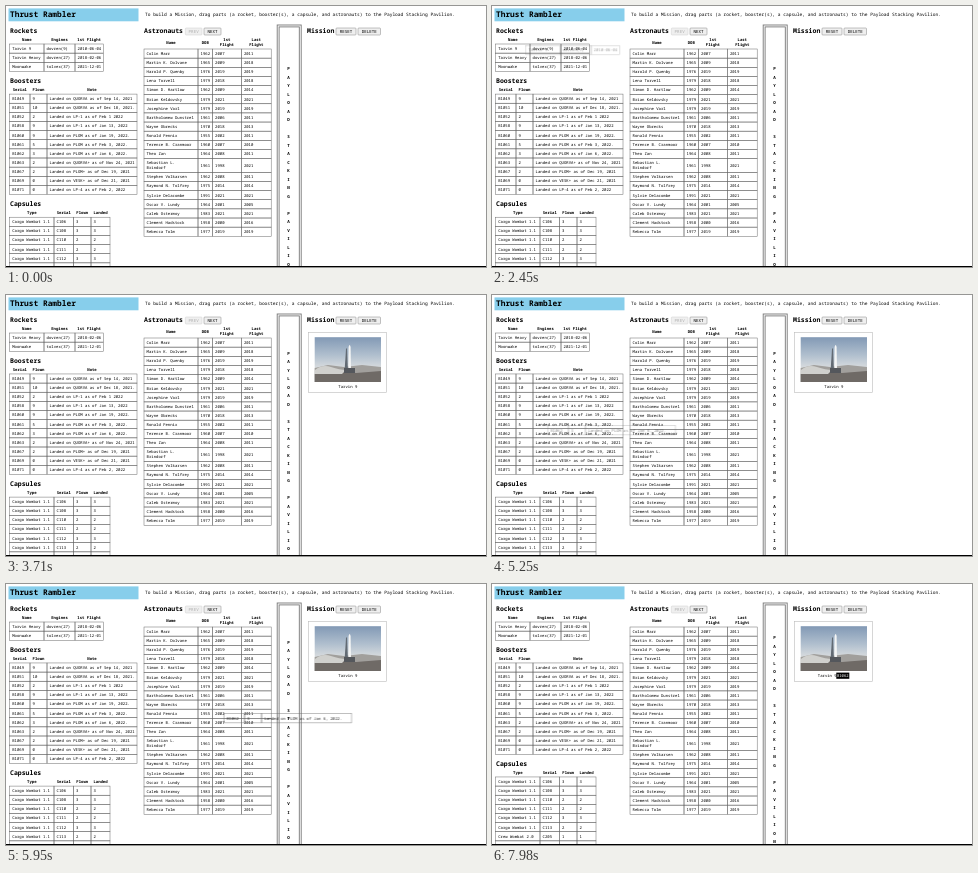
Recreate the animation shown at these times as an HTML page. Size 480x261 px, loop 8 s.

```html
<!DOCTYPE html>
<html lang="en">
<head>
<meta charset="utf-8">
<title>Thrust Rambler</title>
<style>
  html, body { margin: 0; width: 100%; height: 100%; overflow: hidden; background: #fff; }
  svg { display: block; width: 100%; height: 100%; }
  text {
    font: 3.95px "Noto Sans Mono", "DejaVu Sans Mono", monospace;
    text-rendering: geometricPrecision;
    white-space: pre;
  }
</style>
</head>
<body>
<svg id="stage" viewBox="0 0 480 261">
  <defs>
    <linearGradient id="sky" x1="0" y1="0" x2="0" y2="1">
      <stop offset="0" stop-color="#8299b5"/>
      <stop offset=".4" stop-color="#b0bfce"/>
      <stop offset=".7" stop-color="#dadddf"/>
    </linearGradient>
  </defs>
</svg>
<script>
const LOOP = 8000, ROW = 9.13, GAP = 22.7;
const FIRST_DROP = 3710, SECOND_DROP = 6860;
const stage = document.getElementById('stage');

const rockets = [
  ['Tarvin 9', 'dovren(9)', '2010-06-04'],
  ['Tarvin Heavy', 'dovren(27)', '2018-02-06'],
  ['Moonwake', 'tolvex(37)', '2021-12-01']
];
const boosters = [
  ['B1049', '9', 'QUORVA as of Sep 14, 2021'],
  ['B1051', '10', 'QUORVA as of Dec 18, 2021.'],
  ['B1052', '2', 'LP-1 as of Feb 1 2022'],
  ['B1058', '9', 'LP-1 as of Jan 13, 2022'],
  ['B1060', '9', 'PLOM as of Jan 19, 2022.'],
  ['B1061', '5', 'PLOM as of Feb 3, 2022.'],
  ['B1062', '3', 'PLOM as of Jan 6, 2022.'],
  ['B1063', '2', 'QUORVA+ as of Nov 24, 2021'],
  ['B1067', '2', 'PLOM+ as of Dec 19, 2021'],
  ['B1069', '0', 'VESK+ as of Dec 21, 2021'],
  ['B1071', '0', 'LP-4 as of Feb 2, 2022']
].map(([id, flown, note]) => [id, flown, 'Landed on ' + note]);
const capsules = [
  ['C106', 3], ['C108', 3], ['C110', 2], ['C111', 2], ['C112', 3], ['C113', 2], ['C205', 1], ['C206', 2]
].map(([id, n]) => [id < 'C2' ? 'Cargo Wombat 1.1' : 'Crew Wombat 2.0', id, n, n]);
const astronauts = `Colin Marr,1962,2007,2011
Martin K. Dolvane,1965,2009,2018
Harold P. Quenby,1976,2019,2019
Lena Torvell,1979,2018,2018
Simon D. Hartlow,1962,2009,2014
Brian Keldovsky,1979,2021,2021
Josephine Varl,1979,2019,2019
Bartholomew Dunstrel,1961,2006,2011
Wayne Obrecks,1970,2018,2013
Ronald Fennix,1955,2002,2011
Terence B. Cranmoor,1960,2007,2010
Theo Zan,1964,2008,2011
Sebastian L.|Brindorf,1961,1998,2021
Stephen Volkarsen,1962,2008,2011
Raymond N. Tolfrey,1975,2014,2014
Sylvie Delacombe,1991,2021,2021
Oscar V. Lundy,1964,2001,2005
Caleb Ostermoy,1983,2021,2021
Clement Hadstock,1958,2000,2016
Rebecca Tolm,1977,2019,2019`.split('\n').map(line => line.split(','));

const rocketCols = [3.6, 38, 69, 97.3];
const boosterCols = [3.6, 24, 41, 131];
const capsuleCols = [3.6, 48, 67.5, 85, 104];
const astronautCols = [138, 192, 206.5, 235.3, 265.2];

function add(parent, tag, attrs = {}) {
  const el = document.createElementNS('http://www.w3.org/2000/svg', tag);
  for (const k in attrs) el.setAttribute(k, attrs[k]);
  return parent.appendChild(el);
}
function rect(g, x, y, width, height, fill, stroke = 'none', sw = 0.5) {
  return add(g, 'rect', { x, y, width, height, fill, stroke, 'stroke-width': sw });
}
// y is the middle of the line
function text(g, str, x, y, { size = 3.95, bold, fill = '#000', anchor = 'start' } = {}) {
  const el = add(g, 'text', { x, y: y + size * 0.35, fill, 'text-anchor': anchor });
  el.style.fontSize = size + 'px';
  if (bold) el.style.fontWeight = 700;
  el.textContent = str;
}
function heading(g, str, x, y) {
  text(g, str, x, y, { size: 6.5, bold: true });
}
function lines(g, str, x, y, style) {
  const parts = String(str).split('|');
  parts.forEach((s, i) => text(g, s, x, y + (i - (parts.length - 1) / 2) * 4.7, style));
}
function row(g, cols, y, cells, h = ROW) {
  cells.forEach((cell, i) => {
    rect(g, cols[i], y, cols[i + 1] - cols[i], h, 'none', '#6a6a6a');
    lines(g, cell, cols[i] + 2.6, y + h / 2);
  });
}
function table(g, cols, y, heads, rows, headY = y - 4.7) {
  heads.forEach((s, i) =>
    lines(g, s, (cols[i] + cols[i + 1]) / 2, headY, { bold: true, anchor: 'middle' }));
  for (const cells of rows) {
    const h = cells[0].includes('|') ? 13.8 : ROW;
    row(g, cols, y, cells, h);
    y += h;
  }
  return y;
}
function button(g, str, x, w, off) {
  rect(g, x, 22, w, 7, '#efefef', off ? '#cfcfcf' : '#858585', 0.5).setAttribute('rx', 0.8);
  text(g, str, x + w / 2, 25.5, { size: 4.2, anchor: 'middle', fill: off ? '#b0b0b0' : '#000' });
}

function card(g, booster) {
  rect(g, 302.5, 37.5, 78, 60, '#fff', '#bbb', 0.6);
  const shape = (d, fill) => add(g, 'path', { d, fill });
  rect(g, 308.7, 42.2, 66.3, 44.8, 'url(#sky)');
  shape('M308.7 73 L322 70 L338 72 L356 70 L375 72 V87 H308.7Z', '#a19f9c');
  shape('M308.7 79 L328 75 L350 78 L375 76 V87 H308.7Z', '#6f6a66');
  shape('M309 75 Q316 69 325 72 T340 75 L336 79 H309Z', '#d0d0cd');
  shape('M340 54 L341 53 L342 77 H338.5Z', '#626a73');
  shape('M342.4 76 L342.6 52 Q343.6 48 344.6 52 L345 76Z', '#f4f5f5');
  shape('M338 73 H349 V78 H338Z', '#54575c');
  if (booster) {
    text(g, 'Tarvin 9', 325.8, 91.7);
    rect(g, 344.3, 88.6, 13, 6.2, '#000');
    text(g, booster, 344.9, 91.7, { fill: '#fff' });
  } else {
    text(g, 'Tarvin 9', 341.8, 91.7, { anchor: 'middle' });
  }
}

function scene(step) {
  const g = add(stage, 'g');
  const left = step > 0 ? rockets.slice(1) : rockets;
  const stock = step > 1 ? boosters.filter(b => b[0] !== 'B1062') : boosters;
  heading(g, 'Rockets', 4, 24.3);
  let y = table(g, rocketCols, 38, ['Name', 'Engines', '1st Flight'], left);
  heading(g, 'Boosters', 4, y + 9);
  y = table(g, boosterCols, y + GAP, ['Serial', 'Flown', 'Note'], stock);
  heading(g, 'Capsules', 4, y + 9);
  table(g, capsuleCols, y + GAP, ['Type', 'Serial', 'Flown', 'Landed'], capsules);
  [...'PAYLOAD STACKING PAVILION'].forEach((c, i) =>
    text(g, c, 282.6, 63 - step * ROW / 2 + i * 8.5, { bold: true, size: 4.2, anchor: 'middle' }));
  if (step) card(g, step > 1 && 'B1062');
  return g;
}

function play(el, steps, easing) {
  const frames = steps.map(([ms, props]) => ({ ...props, offset: ms / LOOP, easing }));
  frames.push({ ...frames[frames.length - 1], offset: 1 });
  el.animate(frames, { duration: LOOP, iterations: Infinity });
}
function show(el, from, to) {
  const steps = [[0, { opacity: from ? 0 : 1 }]];
  if (from) steps.push([from, { opacity: 1 }]);
  if (to < LOOP) steps.push([to, { opacity: 0 }]);
  play(el, steps, 'step-end');
}
// path: [ms, dx, dy, opacity]
function drag(cols, y, cells, path, end) {
  const outer = add(stage, 'g'), g = add(outer, 'g');
  row(g, cols, y, cells);
  show(outer, path[0][0], end);
  const pose = ([, x, dy, opacity]) => ({ transform: `translate(${x}px, ${dy}px)`, opacity });
  play(g, [[0, pose(path[0])], ...path.map(p => [p[0], pose(p)])], 'linear');
}

// Fixed parts
rect(stage, 2.5, 2.4, 130, 12.9, '#87ceeb');
text(stage, 'Thrust Rambler', 4, 8.6, { size: 7.85, bold: true });
text(stage, 'To build a Mission, drag parts (a rocket, booster(s), a capsule, and astronauts) to the Payload Stacking Pavilion.',
  139, 8.6, { size: 4.54 });
heading(stage, 'Astronauts', 138, 24.3);
button(stage, 'PREV', 179.3, 16.7, true);
button(stage, 'NEXT', 198, 17);
table(stage, astronautCols, 43, ['Name', 'DOB', '1st|Flight', 'Last|Flight'], astronauts, 36.3);
heading(stage, 'Mission', 301, 24.3);
button(stage, 'RESET', 330, 20);
button(stage, 'DELETE', 352, 22.5);
// Double border
rect(stage, 271.2, 19, 24, 300, 'none', '#777', 0.9);
rect(stage, 273.1, 20.9, 20.2, 300, 'none', '#777', 0.9);

// Page states
show(scene(0), 0, FIRST_DROP);
show(scene(1), FIRST_DROP, SECOND_DROP);
show(scene(2), SECOND_DROP, LOOP);

// Dragged rows
drag(rocketCols, 38, rockets[0], [
  [2380, 28, 1.5, 0.3], [2450, 30, 1.7, 0.4], [2590, 62, 2.5, 0.65],
  [2800, 140, 4, 0.85], [2940, 185, 4.7, 0.85], [3080, 211, 5, 0.85], [3360, 228, 5, 0.85]
], FIRST_DROP);
drag(boosterCols, 38 + 2 * ROW + GAP + 6 * ROW, boosters[6], [
  [5110, 30, -2, 0.3], [5250, 52, -3, 0.45], [5390, 105, -3.4, 0.65],
  [5600, 191, -3.8, 0.85], [5950, 214.5, -4, 0.85], [6300, 235, -4.6, 0.85], [6650, 249.8, -5, 0.85]
], SECOND_DROP);

rect(stage, 0, 260, 480, 1, '#000');
</script>
</body>
</html>
```
